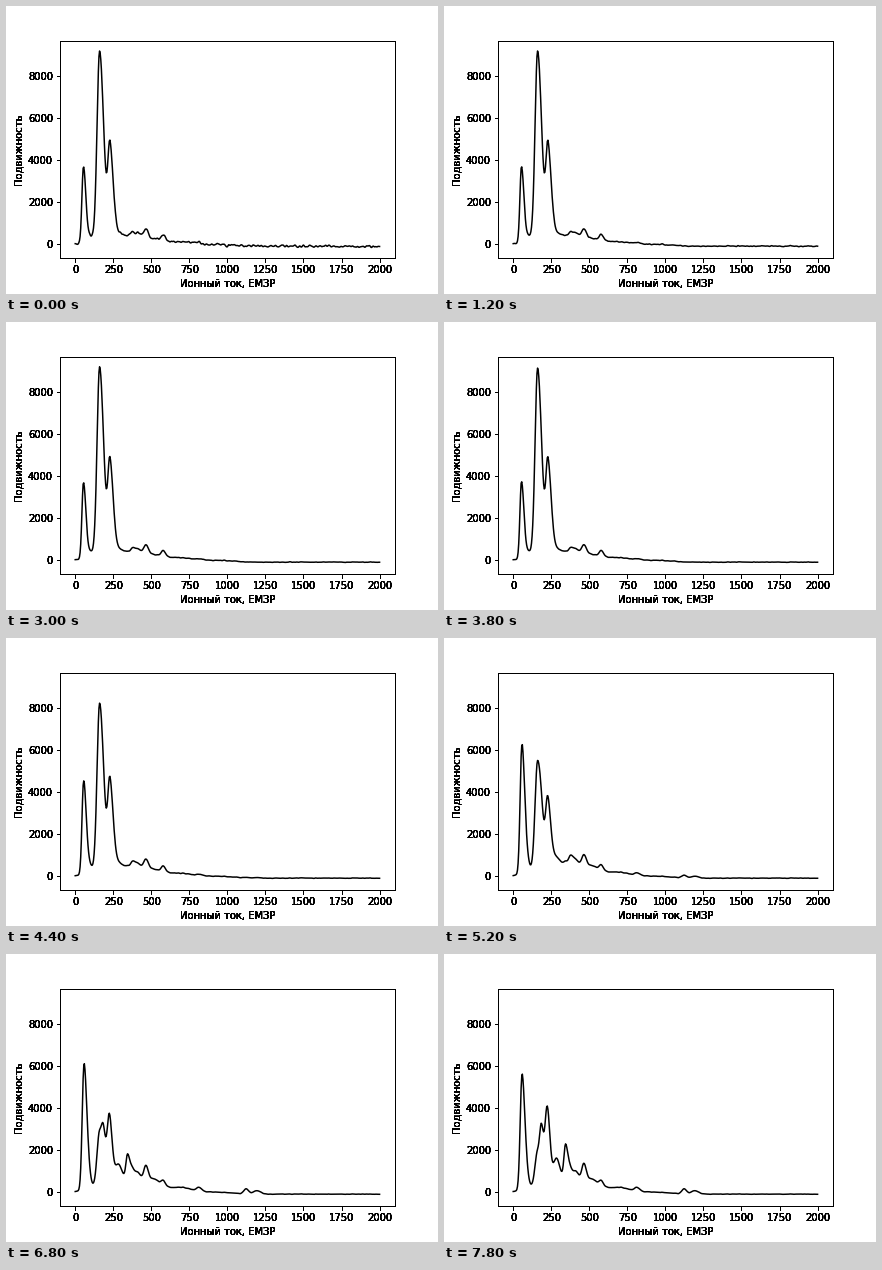
Recreate the animation shown at these times as a matplotlib script. Size 432 by 288 pixels, loop 8 s.

```python
import numpy as np
import matplotlib.pyplot as plt
from matplotlib.animation import FuncAnimation

FRAMES = 40
STEP_MS = 200
LAYERS = 8  # stacked copies harden the antialiased edges of text and ticks
KEYS = [0, 18, 22, 26, 30, 39]  # moments, in frames, at which heights are known

# Rows: centre, left width, then heights. Five heights are one per key state;
# two or three are start, peak of the change and, if it goes on, the end.
STEEP = [
    (54, 10, 3630, 3460, 3100, 2500, 2150),
    (61, 13, 0, 1100, 3280, 4100, 3530),
    (160, 16.5, 9000, 8000, 5200, 3350, 1650),
    (228, 13.5, 4280, 3900, 2400, 1400, 700),
    (320, 130, 400, 455, 580, 640, 620),
    (344, 10.5, 20, 45, 130, 790, 1650),
    (378, 12, 200, 270, 420, 400, 400),
]
ROUND = [
    (100, 20, 290, 70),
    (186, 11, 0, 650, 1790),
    (222, 14, 0, 1480, 2860),
    (284, 18, 140, 450, 1000),
    (415, 15, 150, 250, 370),
    (464, 13.5, 420, 680, 870),
    (520, 24, 20, 240),
    (577, 12, 270, 245),
    (710, 41, 50, 120),
    (812, 15, 35, 180),
    (1122, 14, 0, 250),
    (1192, 21, 0, 165),
]

x = np.linspace(0, 2000, 501)


def bell(centre, left, skew):
    d = x - centre
    width = np.where(d < 0, left, left * skew)
    return np.exp(-(d / width) ** 2 / 2)


def states(h):
    if len(h) < 5:
        rise = h[1] - h[0]
        h = (h[0], h[0] + 0.14 * rise, h[0] + 0.55 * rise, h[1], h[-1])
    return (h[0], *h)  # the first state is held until the second key


def pace(n):
    """The change sets in gently after the second key."""
    a, b = KEYS[1:3]
    return a + (n - a) ** 2 / (b - a) if a < n < b else n


peaks = [(bell(c, w, skew), states(h))
         for rows, skew in ((STEEP, 1.6), (ROUND, 1.2))
         for c, w, *h in rows]
floor = -95 / (1 + np.exp((1040 - x) / 40))

# Detector noise fades as more scans are averaged.
rng = np.random.default_rng(7)
kernel = np.hanning(7)
kernel /= kernel.sum()
scans = [np.convolve(rng.normal(0, 60, x.size), kernel, mode="same")
         for _ in range(FRAMES)]


def spectrum(n):
    t = pace(n)
    signal = sum(shape * np.interp(t, KEYS, h) for shape, h in peaks)
    return signal + floor + np.mean(scans[:n + 1], axis=0)


fig = plt.figure(figsize=(6, 4), dpi=72, facecolor="white")


def add_layer():
    ax = fig.add_axes([0.125, 0.125, 0.775, 0.755], facecolor="none")
    ax.set(xlim=(-100, 2100), ylim=(-660, 9690),
           xticks=range(0, 2001, 250), yticks=range(0, 8001, 2000),
           xlabel="Ионный ток, ЕМЗР", ylabel="Подвижность")
    return ax


ax = [add_layer() for _ in range(LAYERS)][0]
line, = ax.plot(x, spectrum(0), color="black", lw=1.5)


def draw(n):
    line.set_ydata(spectrum(n))
    return line,


anim = FuncAnimation(fig, draw, frames=FRAMES, interval=STEP_MS,
                     repeat=True, repeat_delay=0, blit=False)
plt.show()
```
